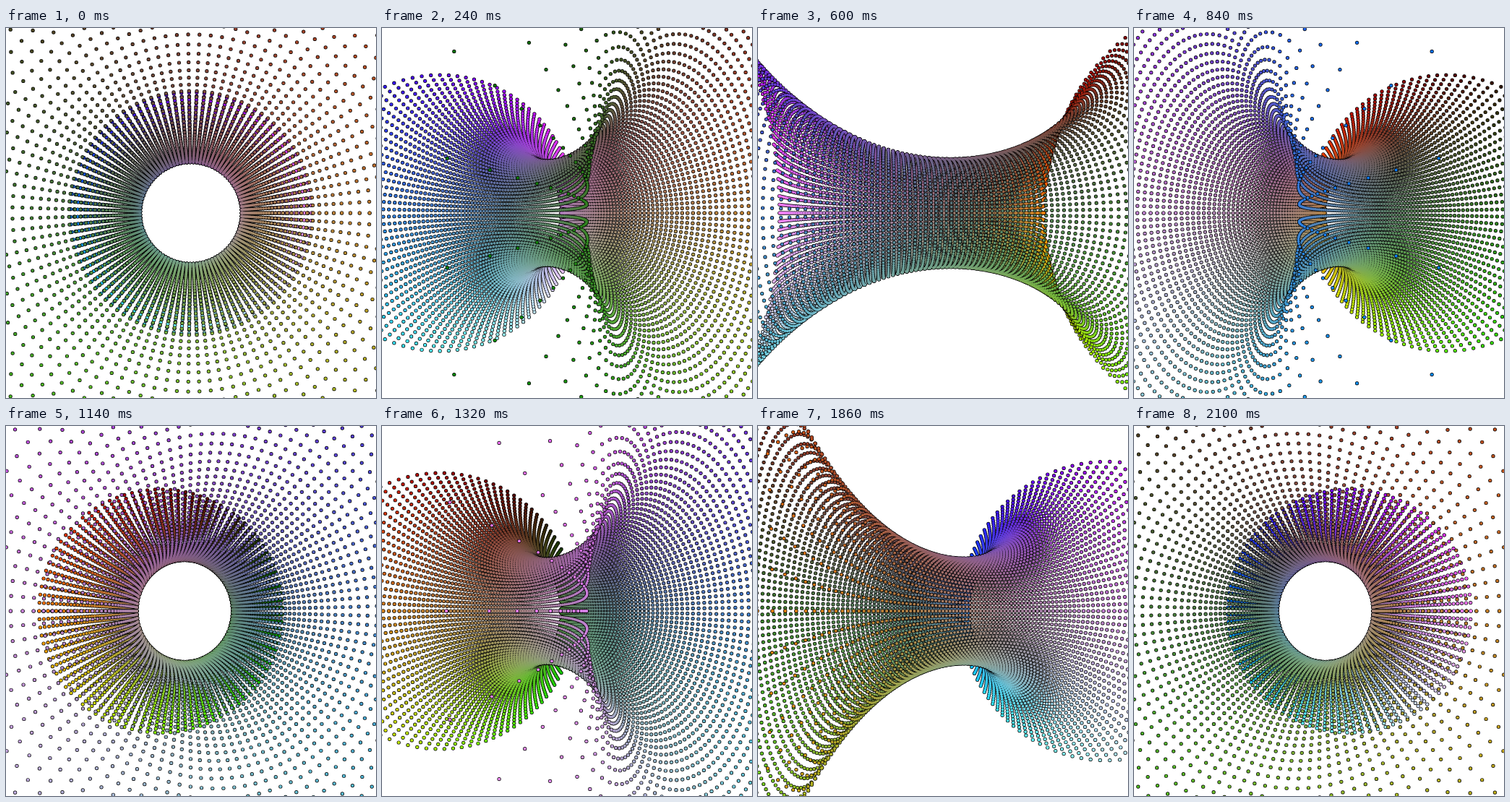
Recreate the animation shown at these times as an HTML page with a canvas. Size 512 by 512 pixels, loop 2.16 s.

```html
<!DOCTYPE html>
<html lang="en">
<head>
<meta charset="utf-8">
<title>Rotating catenoid</title>
<style>
  html, body { margin: 0; width: 100%; height: 100%; overflow: hidden; background: #fff; }
  canvas { display: block; width: 512px; height: 512px; }
</style>
</head>
<body>
<canvas id="stage" width="512" height="512"></canvas>
<script>
const SIZE = 512, MID = SIZE / 2;
const STEPS = 36, STEP_MS = 60;
const COUNT = 100, V_MAX = 2, STRETCH = 2;
const CAMERA = 6;
const FOCAL = MID / Math.tan(Math.PI / 6);
const FILL = 1.9, OUTLINE = 2.6;
const OUTLINE_BEHIND = 0.3;
const RIM = Math.cosh(V_MAX), END = V_MAX * STRETCH;

const ctx = document.getElementById('stage').getContext('2d');
const channel = (value, limit) => Math.round(127.5 * (1 + value / limit));

// Catenoid grid; each colour channel follows one coordinate.
// Every dot is a coloured disc with a larger black one slightly behind it.
const discs = [];
for (let i = 0; i < COUNT; i++) {
  const v = V_MAX * (2 * i / (COUNT - 1) - 1);
  const r = Math.cosh(v), z = v * STRETCH;
  for (let j = 0; j < COUNT; j++) {
    const u = 2 * Math.PI * j / (COUNT - 1);
    const x = r * Math.cos(u), y = r * Math.sin(u);
    const color = `rgb(${channel(x, RIM)},${channel(y, RIM)},${channel(z, END)})`;
    discs.push({ x, y, z, color: '#000', radius: OUTLINE, behind: OUTLINE_BEHIND });
    discs.push({ x, y, z, color, radius: FILL, behind: 0 });
  }
}

const onStage = d => Math.abs(d.px - MID) < MID + 3 && Math.abs(d.py - MID) < MID + 3;

function draw(step) {
  const angle = 2 * Math.PI * step / STEPS;
  const c = Math.cos(angle), s = Math.sin(angle);
  for (const d of discs) {
    const depth = CAMERA + d.z * c + d.x * s;
    const scale = FOCAL / depth;
    d.px = MID + (d.x * c - d.z * s) * scale;
    d.py = MID + d.y * scale;
    d.order = depth + d.behind;
  }

  ctx.fillStyle = '#fff';
  ctx.fillRect(0, 0, SIZE, SIZE);
  for (const d of discs.filter(onStage).sort((a, b) => b.order - a.order)) {
    ctx.fillStyle = d.color;
    ctx.beginPath();
    ctx.arc(d.px, d.py, d.radius, 0, 2 * Math.PI);
    ctx.fill();
  }
}

const start = performance.now();
let shown = 0;
function tick() {
  const step = Math.floor((performance.now() - start) / STEP_MS) % STEPS;
  if (step !== shown) draw(shown = step);
  requestAnimationFrame(tick);
}
draw(0);
requestAnimationFrame(tick);
</script>
</body>
</html>
```
